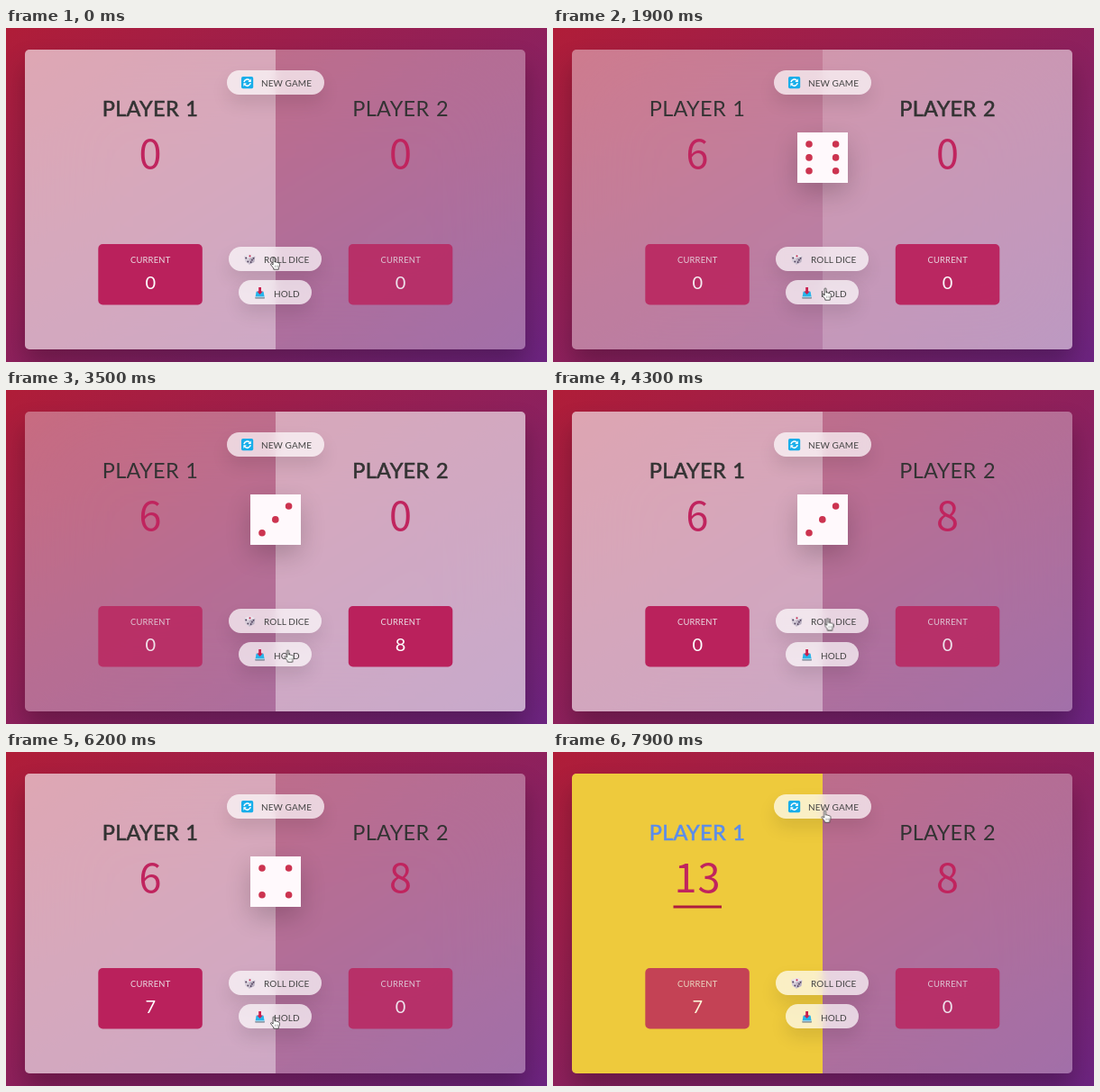
These frames come from a looping animation (600 px wide and 371 px high, 8000 ms). An HTML page:

```html
<!DOCTYPE html>
<html lang="en">
<head>
<meta charset="utf-8">
<title>Dice game</title>
<style>
html, body { margin: 0; width: 100%; height: 100%; overflow: hidden; }
body { position: relative; background: linear-gradient(to top left, #6c2480, #b01d38); }
.board, .player, .btn, .dice, svg.scene { position: absolute; }
.board {
  left: 21px; top: 24px; width: 555px; height: 333px;
  border-radius: 5px; overflow: hidden;
  background: rgba(255,255,255,.35);
  -webkit-backdrop-filter: blur(50px); backdrop-filter: blur(50px);
  box-shadow: 0 17px 28px rgba(0,0,0,.25);
}
.player { top: 0; width: 277.5px; height: 100%; }
.player.one { left: 0; animation: panel1 8s infinite; }
.player.two { left: 277.5px; animation: panel2 8s infinite; }
.dice {
  left: 271px; top: 116px; width: 55.5px; height: 55.5px;
  background: #fff9fc; box-shadow: 0 11px 28px rgba(0,0,0,.2);
}
.btn {
  height: 27px; border-radius: 14px;
  background: rgba(255,255,255,.7);
  -webkit-backdrop-filter: blur(5px); backdrop-filter: blur(5px);
  box-shadow: 0 10px 19px rgba(0,0,0,.1);
}
.new { left: 245px; top: 47px; width: 108px; }
.roll { left: 247px; top: 243px; width: 103px; }
.hold { left: 258px; top: 280px; width: 81px; }

svg.scene { left: 0; top: 0; font-family: Lato, "Open Sans", sans-serif; }
.name {
  font-size: 23.5px; letter-spacing: .3px; word-spacing: 1.1px;
  text-anchor: middle; fill: #333; stroke: #333; stroke-width: 0;
}
.active .name { stroke-width: .6px; }
.winner .name { fill: #5a8cec; stroke: #5a8cec; }
.score {
  font-family: "Noto Sans CJK JP", "Noto Sans CJK SC", Lato, sans-serif;
  font-size: 45px; letter-spacing: 1px; text-anchor: middle; fill: #c0245e;
}
.line { fill: #ad1d3f; visibility: hidden; }
.winner .line { visibility: visible; }
.label { font-size: 9.4px; letter-spacing: .2px; text-anchor: middle; fill: #eadbe2; }
.points { font-size: 20px; text-anchor: middle; fill: #fff; }
.caption { font-size: 10px; letter-spacing: .1px; fill: #444; }
.box rect { fill: #ba215c; }
.one .box { animation: box1 8s infinite; }
.two .box { animation: box2 8s infinite; }
.pip { fill: #cc3450; }
#cursor { animation: move 8s infinite; }

@keyframes panel1 {
  0%, 19.75% { background-color: rgba(255,255,255,.4); animation-timing-function: ease; }
  29.1%, 46.25% { background-color: rgba(255,255,255,0); animation-timing-function: ease; }
  55.6%, 79.5% { background-color: rgba(255,255,255,.4); animation-timing-function: ease; }
  88.9%, 100% { background-color: #eeca3c; }
}
@keyframes panel2 {
  0%, 19.75% { background-color: rgba(255,255,255,0); animation-timing-function: ease; }
  29.1%, 46.25% { background-color: rgba(255,255,255,.4); animation-timing-function: ease; }
  55.6%, 100% { background-color: rgba(255,255,255,0); }
}
@keyframes box1 {
  0%, 19.75% { opacity: 1; }
  29.1%, 46.25% { opacity: .8; }
  55.6%, 79.5% { opacity: 1; }
  88.9%, 100% { opacity: .8; }
}
@keyframes box2 {
  0%, 19.75% { opacity: .8; }
  29.1%, 46.25% { opacity: 1; }
  55.6%, 100% { opacity: .8; }
}
@keyframes move {
  0%, 12.75% { transform: translate(297px, 255px); animation-timing-function: ease-in-out; }
  17.5%, 25% { transform: translate(302px, 289px); animation-timing-function: ease-in-out; }
  28.5%, 37.5% { transform: translate(301px, 254px); animation-timing-function: ease-in-out; }
  42%, 47.5% { transform: translate(312.5px, 289px); animation-timing-function: ease-in-out; }
  53.5%, 67.5% { transform: translate(304.5px, 253.5px); animation-timing-function: ease-in-out; }
  73%, 86.25% { transform: translate(297px, 294px); animation-timing-function: ease-in-out; }
  94%, 100% { transform: translate(301.5px, 65px); }
}
</style>
</head>
<body>
<div class="board">
  <div class="player one"></div>
  <div class="player two"></div>
</div>
<div class="dice" id="dice"></div>
<div class="btn new"></div>
<div class="btn roll"></div>
<div class="btn hold"></div>

<svg class="scene" width="600" height="371" viewBox="0 0 600 371">
  <g class="one" id="p1">
    <text class="name" x="160" y="98">PLAYER 1</text>
    <text class="score" x="160.6" y="156">0</text>
    <rect class="line" x="133.5" y="170.5" width="53.5" height="3"/>
    <g class="box">
      <rect x="102.3" y="240" width="115.5" height="67.5" rx="5"/>
      <text class="label" x="160.2" y="261">CURRENT</text>
      <text class="points" x="160.2" y="290">0</text>
    </g>
  </g>
  <g class="two" id="p2">
    <text class="name" x="437.6" y="98">PLAYER 2</text>
    <text class="score" x="438" y="156">0</text>
    <g class="box">
      <rect x="379.8" y="240" width="115.5" height="67.5" rx="5"/>
      <text class="label" x="437.7" y="261">CURRENT</text>
      <text class="points" x="437.6" y="290">0</text>
    </g>
  </g>

  <g id="pips"></g>

  <text class="caption" x="283" y="65.3">NEW GAME</text>
  <text class="caption" x="286" y="261">ROLL DICE</text>
  <text class="caption" x="297" y="298.5">HOLD</text>

  <!-- circling arrows -->
  <g transform="translate(267.6 60.6)">
    <rect x="-6.6" y="-6.6" width="13.2" height="13.2" rx="1.8" fill="#18aeea"/>
    <g fill="none" stroke="#fff" stroke-width="1.5">
      <path d="M-3.6 -.6A3.6 3.6 0 0 1 2.6 -2.4"/>
      <path d="M3.6 .6A3.6 3.6 0 0 1 -2.6 2.4"/>
    </g>
    <path d="M4.2 -4.2V-.7H.7ZM-4.2 4.2V.7H-.7Z" fill="#fff"/>
  </g>

  <!-- small die -->
  <g transform="translate(270.3 256.8)">
    <path d="M-6 -3.6L1 -5.8L6 -3L5 3.2L-.6 6L-5 2.6Z" fill="#d6cdd9"/>
    <path d="M-6 -3.6L1 -5.8L6 -3L-.4 -1Z" fill="#eee8ef"/>
    <path d="M-.4 -1L6 -3L5 3.2L-.6 6Z" fill="#b9afc0"/>
    <g fill="#4b3c58">
      <circle cx=".2" cy="-3.5" r="1.1" fill="#c52e55"/>
      <circle cx="-4.1" cy="-1.3" r=".9"/>
      <circle cx="-2" cy="2.7" r=".9"/>
      <circle cx="1.4" cy="3.3" r=".9"/>
      <circle cx="2.6" cy=".9" r=".9"/>
      <circle cx="4.2" cy="-1" r=".9"/>
    </g>
  </g>

  <!-- tray with arrow -->
  <g transform="translate(281.6 294.2)">
    <path d="M-4 -1.5H4L4.8 3.2V5.4H-4.8V3.2Z" fill="#27b4ea"/>
    <path d="M-5.2 5.7H5.2" stroke="#55616e" stroke-width="1.1"/>
    <path d="M-4.6 4.6H4.6" stroke="#d9e6ee" stroke-width=".9"/>
    <path d="M-1.4 -6.3H1.4V-1.6H3.2L0 1.8L-3.2 -1.6H-1.4Z" fill="#c91f4d"/>
  </g>

  <g id="cursor">
    <path d="M-.9 .8C-.9 -.4 1 -.4 1 .8V5L2.6 4.9L3.3 5.4L4.6 5.5L5.1 6.1C6.1 6 6.5 6.5 6.5 7.4C6.5 9.7 5.7 10.7 5.3 11.6V13.2H-.2V11.9C-1.4 10.5 -2.7 8.9 -3.4 7.6C-3.7 6.6 -2.6 6.3 -1.9 7L-.9 8.1Z"
      fill="#fff" stroke="#333" stroke-width=".8" stroke-linejoin="round"/>
    <path d="M1.4 8.5V11M3.1 8.5V11M4.7 8.5V11" stroke="#777" stroke-width=".5"/>
  </g>
</svg>

<script>
const LOOP = 8000;
// Each step: start time, active player, scores, current points, die face
const steps = [
  { at: 0,    turn: 1, score: [0, 0],  points: [0, 0], face: 0 },
  { at: 450,  turn: 1, score: [0, 0],  points: [6, 0], face: 6 },
  { at: 1580, turn: 2, score: [6, 0],  points: [0, 0], face: 6 },
  { at: 2420, turn: 2, score: [6, 0],  points: [0, 5], face: 5 },
  { at: 2920, turn: 2, score: [6, 0],  points: [0, 8], face: 3 },
  { at: 3700, turn: 1, score: [6, 8],  points: [0, 0], face: 3 },
  { at: 4620, turn: 1, score: [6, 8],  points: [3, 0], face: 3 },
  { at: 5250, turn: 1, score: [6, 8],  points: [7, 0], face: 4 },
  { at: 6360, turn: 1, score: [13, 8], points: [7, 0], face: 0, won: true }
];

const dice = document.getElementById('dice');
const pips = document.getElementById('pips');
const players = ['p1', 'p2'].map(id => document.getElementById(id));

function drawFace(n) {
  const spots = [];
  if (n % 2) spots.push([0, 0]);
  if (n > 1) spots.push([1, -1], [-1, 1]);
  if (n > 3) spots.push([-1, -1], [1, 1]);
  if (n === 6) spots.push([-1, 0], [1, 0]);
  pips.innerHTML = spots.map(([x, y]) =>
    `<circle class="pip" cx="${298.8 + x * 14.8}" cy="${143.9 + y * 14.9}" r="3.8"/>`).join('');
  dice.style.visibility = n ? 'visible' : 'hidden';
}

function show(step) {
  players.forEach((p, i) => {
    const active = step.turn === i + 1;
    p.classList.toggle('active', active);
    p.classList.toggle('winner', active && !!step.won);
    p.querySelector('.score').textContent = step.score[i];
    p.querySelector('.points').textContent = step.points[i];
  });
  drawFace(step.face);
}

let start, shown;
function tick(now) {
  start ??= now;
  const t = (now - start) % LOOP;
  const step = steps.findLast(s => s.at <= t);
  if (step !== shown) show(shown = step);
  requestAnimationFrame(tick);
}
show(shown = steps[0]);
requestAnimationFrame(tick);
</script>
</body>
</html>
```
